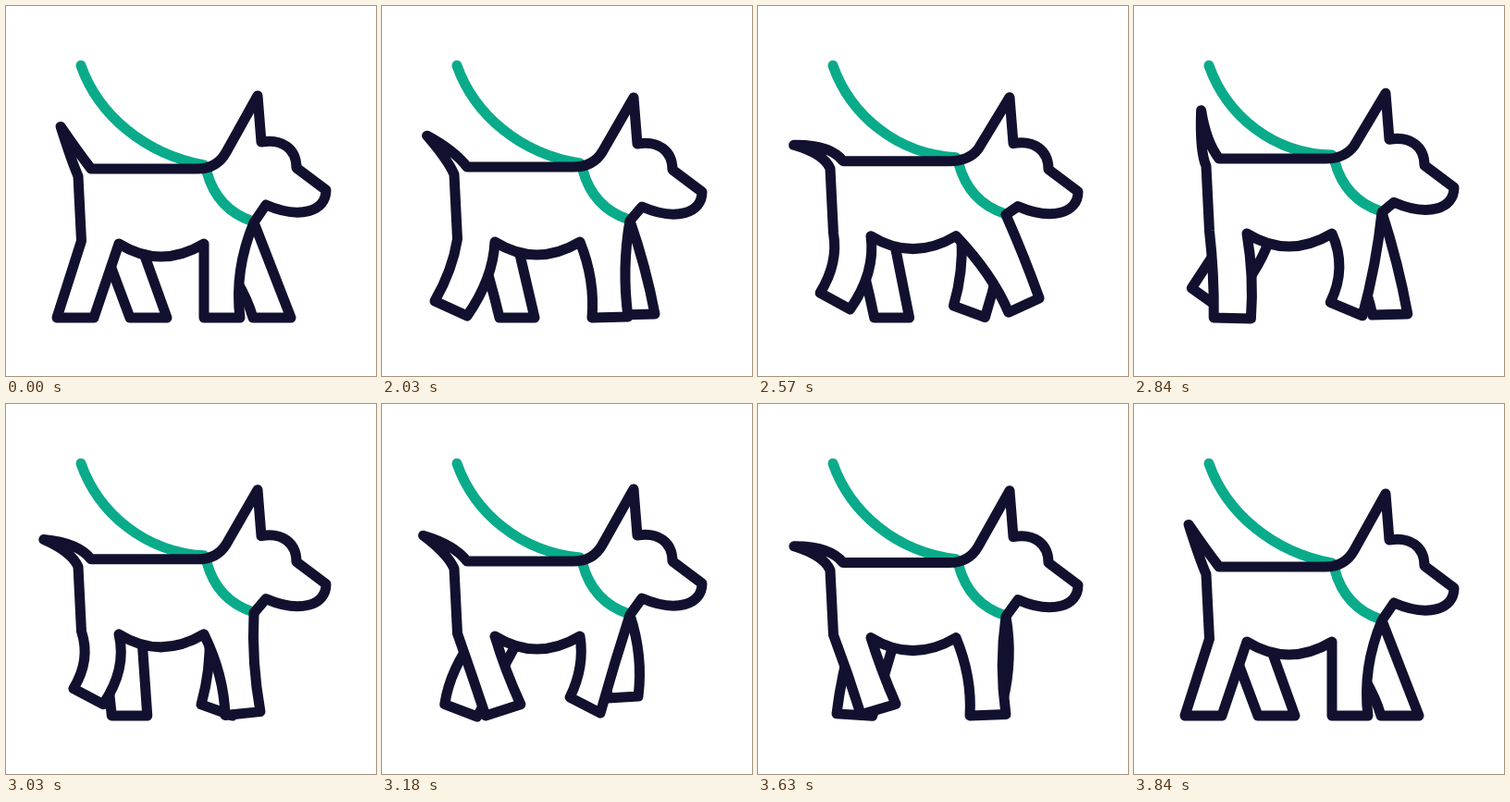
Animation, 400 px wide and 400 px high, one loop 3.87 s. Source, as an HTML page with a canvas:

```html
<!DOCTYPE html>
<html lang="en">
<head>
<meta charset="utf-8">
<title>Dog on a leash</title>
<style>
html, body { margin: 0; width: 100%; height: 100%; overflow: hidden; background: #fff; }
canvas { display: block; width: 400px; height: 400px; }
</style>
</head>
<body>
<canvas id="stage"></canvas>
<script>
const INK = '#11112f', GREEN = '#0aab8a';
const LOOP = 3870, START = 2030, STEP = 30.17, LAST = 60;
const GAIT = 463;                       // ms per stride

const canvas = document.getElementById('stage');
const ctx = canvas.getContext('2d');
const dpr = window.devicePixelRatio || 1;
canvas.width = canvas.height = 400 * dpr;

// Monotone cubic through rows [x, v1, v2, ...]
function curve(rows, x) {
  const n = rows.length;
  if (x <= rows[0][0]) return rows[0].slice(1);
  if (x >= rows[n - 1][0]) return rows[n - 1].slice(1);
  let i = 0;
  while (x >= rows[i + 1][0]) i++;
  const slope = (k, c) => (rows[k + 1][c] - rows[k][c]) / (rows[k + 1][0] - rows[k][0]);
  const tangent = (k, c) => {
    if (k === 0) return slope(0, c);
    if (k === n - 1) return slope(n - 2, c);
    const a = slope(k - 1, c), b = slope(k, c);
    return a * b <= 0 ? 0 : 2 * a * b / (a + b);
  };
  const w = rows[i + 1][0] - rows[i][0], s = (x - rows[i][0]) / w;
  const s2 = s * s, s3 = s2 * s;
  return rows[i].slice(1).map((p, j) => {
    const c = j + 1;
    return p * (2 * s3 - 3 * s2 + 1) + rows[i + 1][c] * (3 * s2 - 2 * s3) +
      w * (tangent(i, c) * (s3 - 2 * s2 + s) + tangent(i + 1, c) * (s3 - s2));
  });
}

// Strides as [phase, heel x, y, toe x, y, rear bend, front bend]; lift-off is near phase 0
const wrap = rows => {
  const shift = (r, d) => [r[0] + d, ...r.slice(1)];
  return [...rows.slice(-2).map(r => shift(r, -1)), ...rows, ...rows.slice(0, 2).map(r => shift(r, 1))];
};
const hindNear = wrap([
  [0, 57, 319, 92, 335, 7, 13],
  [.22, 82, 306, 114, 322, 16, 18],
  [.484, 112, 337, 150, 325, 0, -3],
  [.583, 100, 337, 142, 338, -3, 8],
  [.749, 79, 337, 118, 338, 5, 4],
  [.909, 55, 337, 95, 337, 0, 0]
]);
const hindFar = wrap([
  [0, 67, 324, 102, 338, -12, 0],
  [.08, 58, 308, 92, 334, 0, 0],
  [.2, 70, 304, 104, 326, 0, 22],
  [.34, 105, 319, 138, 323, 8, 10],
  [.5, 134, 337, 174, 337, 0, 0],
  [.56, 127, 337, 165, 337, 2, 0],
  [.8, 95, 337, 135, 337, 0, 0]
]);
const foreNear = wrap([
  [0, 206, 322, 238, 337, 28, 18],
  [.06, 203, 317, 236, 334, 10, -2],
  [.17, 230, 326, 267, 336, 28, 14],
  [.5, 272, 332, 305, 315, 10, 0],
  [.72, 227, 337, 266, 336, 10, -8],
  [.88, 214, 337, 253, 337, 0, -14]
]);
const foreFar = wrap([
  [0, 211, 325, 245, 337, 6, 6],
  [.33, 245, 318, 278, 316, 10, 10],
  [.48, 265, 337, 303, 332, 12, 0],
  [.53, 267, 337, 308, 337, 12, 0],
  [.57, 257, 334, 295, 333, 10, 4],
  [.62, 246, 337, 287, 337, 10, 0],
  [.9, 211, 332, 251, 337, 0, 4]
]);

// Per key time: back height, head offset, phases of far hind, near fore and far fore legs
const poses = [
  [2030, 174, 2, .56, .72, .57],
  [2300, 171, 4.2, 1.08, 1, 1.48],
  [2840, 165, -3, 2.2, 2.17, 2.62],
  [3180, 170, -5, 3, 3.06, 3.33],
  [3420, 169, -5.3, 3.34, 3.5, 3.9],
  [3840, 176, 0, 4.5, 3.88, 4.53]
];

const foot = (stride, phase) => curve(stride, phase - Math.floor(phase));
const bend = (x0, y0, x1, y1, k) =>
  ctx.quadraticCurveTo((x0 + x1) / 2 + k, (y0 + y1) / 2, x1, y1);

function leg([lx, ly, rx, ry, kl, kr], ax, ay, bx, by) {
  ctx.lineTo(ax, ay);
  bend(ax, ay, lx, ly, kl);
  ctx.lineTo(rx, ry);
  bend(rx, ry, bx, by, kr);
}

function farLeg(f, ax, ay, bx, by) {
  ctx.beginPath();
  ctx.moveTo(ax, ay);
  leg(f, ax, ay, bx, by);
  ctx.fill();
  ctx.stroke();
}

function tracePath(back, h, tailX, near, fore) {
  const tailY = back - 52.3 + .0265 * (75 - tailX) ** 2;
  const belly = back + 81;
  ctx.beginPath();
  ctx.moveTo(78, back + 8);
  leg(near, 81.5, back + 78, 122, belly);
  ctx.quadraticCurveTo(167, belly + 28, 214, belly);
  leg(fore, 214, belly, 268, back + 58);
  ctx.lineTo(281, 215 + h);
  ctx.bezierCurveTo(318, 231 + h, 346, 222 + h, 346, 199 + h);
  ctx.lineTo(314, 175 + h);
  ctx.bezierCurveTo(314, 154 + h, 298, 143 + h, 276, 147 + h);
  ctx.lineTo(272, 97 + h);
  ctx.lineTo(238, 158 + (back - 176 + h) / 2);
  ctx.quadraticCurveTo(228, back, 207, back);
  ctx.lineTo(92, back);
  ctx.quadraticCurveTo(78, back - 18, tailX, tailY);
  ctx.quadraticCurveTo(71, back - 8, 78, back + 8);
  ctx.closePath();
}

function draw(t) {
  const [back, h, hindPh, forePh, farPh] = curve(poses, t);
  const tailX = 55 + 18 * Math.cos(2 * Math.PI * (t - 2210) / 585);

  ctx.setTransform(dpr, 0, 0, dpr, 0, 0);
  ctx.fillStyle = '#fff';
  ctx.fillRect(0, 0, 400, 400);
  ctx.lineWidth = 11;
  ctx.lineJoin = ctx.lineCap = 'round';

  ctx.strokeStyle = INK;
  farLeg(foot(hindFar, hindPh), 103, back + 78, 147, back + 86);
  farLeg(foot(foreFar, farPh), 220, back + 82, 268, back + 58);

  tracePath(back, h, tailX, foot(hindNear, (t - START) / GAIT), foot(foreNear, forePh));
  ctx.fill();

  ctx.strokeStyle = GREEN;
  ctx.beginPath();
  ctx.moveTo(81, 64.3);
  ctx.bezierCurveTo(100, 118, 150, 160, 214, back - 4);
  ctx.moveTo(217, back + 3);
  ctx.quadraticCurveTo(228, back + 44, 267, back + 57);
  ctx.stroke();

  ctx.strokeStyle = INK;
  tracePath(back, h, tailX, foot(hindNear, (t - START) / GAIT), foot(foreNear, forePh));
  ctx.stroke();
}

function tick() {
  const t = performance.now() % LOOP;
  const i = t < START ? LAST : Math.min(LAST, Math.floor((t - START) / STEP));
  draw(START + i * STEP);
  requestAnimationFrame(tick);
}
tick();
</script>
</body>
</html>
```
